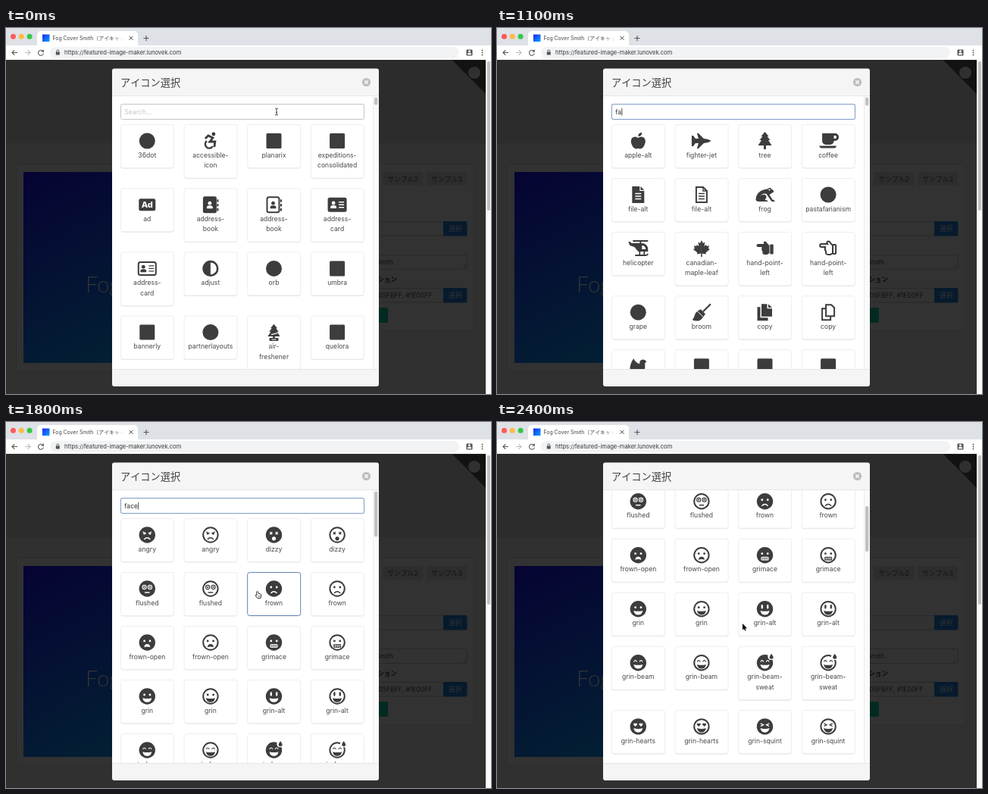
An HTML page with a canvas that plays this animation: 640x483 px, repeating every 2.5 s.

```html
<!DOCTYPE html>
<html lang="ja">
<head>
<meta charset="utf-8">
<title>Icon picker</title>
<style>
html, body { margin: 0; width: 100%; height: 100%; overflow: hidden; background: #303030; }
canvas { display: block; width: 640px; height: 483px; }
</style>
</head>
<body>
<canvas id="stage"></canvas>
<script>
const W = 640, H = 483, LOOP = 2500, STEP = 100;
const canvas = document.getElementById('stage');
const c = canvas.getContext('2d');
const ratio = window.devicePixelRatio || 1;
canvas.width = W * ratio;
canvas.height = H * ratio;

const SANS = 'Inter, "Noto Sans CJK JP", "Noto Sans CJK", sans-serif';
const INK = '#3d3d3d';

function rect(x, y, w, h, fill, r = 0, stroke, lw = 1) {
  c.beginPath();
  c.roundRect(x, y, w, h, r);
  if (fill) { c.fillStyle = fill; c.fill(); }
  if (stroke) { c.strokeStyle = stroke; c.lineWidth = lw; c.stroke(); }
}
function disc(x, y, r, fill) {
  c.beginPath();
  c.arc(x, y, r, 0, 7);
  c.fillStyle = fill;
  c.fill();
}
function ring(x, y, r, stroke, lw) {
  c.beginPath();
  c.arc(x, y, r, 0, 7);
  c.strokeStyle = stroke;
  c.lineWidth = lw;
  c.stroke();
}
function line(d, stroke, lw = 1) {
  c.strokeStyle = stroke;
  c.lineWidth = lw;
  c.stroke(new Path2D(d));
}
function shape(d, fill = INK) {
  c.fillStyle = fill;
  c.fill(new Path2D(d), 'evenodd');
}
function text(s, x, y, size, fill, align = 'left', weight = 400, family = SANS) {
  c.font = `${weight} ${size}px ${family}`;
  c.textAlign = align;
  c.fillStyle = fill;
  c.fillText(s, x, y);
}

// Faces: [eyes, mouth]
const faces = {
  'angry': ['angry', 'frown'], 'dizzy': ['cross', 'round'], 'flushed': ['ring', 'flat'],
  'frown': ['dot', 'frown'], 'frown-open': ['dot', 'gasp'], 'grimace': ['dot', 'teeth'],
  'grin': ['dot', 'grin'], 'grin-alt': ['tall', 'grin'], 'grin-beam': ['arc', 'grin'],
  'grin-beam-sweat': ['arc', 'grin'], 'grin-hearts': ['heart', 'grin'], 'grin-squint': ['squint', 'grin']
};
const eyes = {
  dot(f) { disc(0, 0, 1.4, f); },
  angry(f, side) { line(`M${-2.3 * side},0 L${2.2 * side},-2`, f, 1.3); disc(0, .3, 1.4, f); },
  cross(f) { line('M-1.5,-1.8 L1.5,1.2 M1.5,-1.8 L-1.5,1.2', f, 1.4); },
  ring(f) { ring(0, 0, 2.6, f, 1.1); disc(0, 0, 1.1, f); },
  tall(f) { c.beginPath(); c.ellipse(0, -1, 1.3, 3, 0, 0, 7); c.fillStyle = f; c.fill(); },
  arc(f) { line('M-2,.8 Q0,-2.8 2,.8', f, 1.2); },
  heart(f) { shape('M0,2 L-2.6,-.6 Q-2.7,-2.6 -1,-2.5 L0,-1.8 Q2.4,-3.4 2.6,-.6Z', f); },
  squint(f, side) { line(`M${2 * side},-2 L${-1.7 * side},-.2 L${2 * side},1.6`, f, 1.3); }
};
const mouths = {
  frown(f) { line('M-4,6 Q0,1.6 4,6', f, 1.5); },
  round(f) { disc(0, 4.8, 2.6, f); },
  flat(f) { line('M-3.2,5 H3.2', f, 1.5); },
  gasp(f) { shape('M-4,6.2 Q-3.5,2 0,2 Q3.5,2 4,6.2 Q0,4.6 -4,6.2Z', f); },
  grin(f) { shape('M-6,2.2 Q0,4 6,2.2 Q5,7.8 0,7.8 Q-5,7.8 -6,2.2Z', f); },
  teeth(f, back) {
    rect(-5.2, 2, 10.4, 5, f, 2);
    line('M-5,4.5 H5 M-2.5,2 V7 M0,2 V7 M2.5,2 V7', back, .6);
  }
};
function face(name, outline) {
  const ink = outline ? INK : '#fff', back = outline ? '#fff' : INK;
  const [eye, mouth] = faces[name];
  if (outline) ring(0, 0, 9.7, INK, 2); else disc(0, 0, 10.7, INK);
  for (const side of [-1, 1]) {
    c.save();
    c.translate(3.7 * side, -2);
    eyes[eye](ink, side);
    c.restore();
  }
  mouths[mouth](ink, back);
  if (name.endsWith('sweat')) {
    disc(8, -8, 4.2, '#fff');
    shape('M8.5,-12 Q14,-5 8.5,-5 Q3.5,-5 8.5,-12Z');
  }
}

function person(x, y, s, fill) {
  disc(x, y - 2.6 * s, 2.4 * s, fill);
  rect(x - 4 * s, y + .4 * s, 8 * s, 4 * s, fill, [3 * s, 3 * s, .6, .6]);
}
function panel(x, y, w, h, r, outline) {
  if (outline) rect(x + 1, y + 1, w - 2, h - 2, '#fff', r, INK, 2);
  else rect(x, y, w, h, INK, r);
  return outline ? INK : '#fff';
}
// Filled, or outlined with a white inside
function solid(d, outline) {
  if (outline) { shape(d, '#fff'); line(d, INK, 2); } else shape(d);
}
const TREE = 'M0,-12 L5,-6 H3 L7,-1 H4.5 L9,6 H1.5 V11 H-1.5 V6 H-9 L-4.5,-1 H-7 L-3,-6 H-5Z';
const icons = {
  square() { rect(-10, -10, 20, 20, INK, 1.5); },
  circle() { disc(0, 0, 10.5, INK); },
  wheel() {
    disc(4, -9, 2.4, INK);
    line('M-7,-3 L-3,-7 L3,-4 L-1,1 H6 L5,8', INK, 2.8);
    line('M-5,0 A5.4,5.4 0 1 0 3,7', INK, 2.4);
  },
  ad() {
    rect(-11, -8, 22, 16, INK, 2.5);
    text('Ad', 0, 4, 11, '#fff', 'center', 800);
  },
  book(o) {
    const f = panel(-10, -11, 18, 22, 2.5, o);
    for (const y of [-7, -1.2, 4.6]) rect(8.5, y, 2, 3.6, INK, .5);
    person(-1, .6, 1, f);
  },
  card(o) {
    const f = panel(-12.5, -9.5, 25, 19, 2.5, o);
    person(-5, .4, 1, f);
    line('M2,-3.5 H9 M2,0 H9 M2,3.5 H9', f, 1.4);
  },
  adjust() { ring(0, 0, 9.3, INK, 2.6); shape('M0,-9 A9,9 0 0 0 0,9Z'); },
  freshener() {
    c.save(); c.scale(.9, .9); shape(TREE); c.restore();
    rect(-6, 7.5, 12, 4, INK, 1);
    line('M-3.5,3 L4.5,1', '#fff', 1.2);
    line('M-3,9.5 H3', '#fff', 1);
  },
  fruit() {
    shape('M0,-4 Q4,-7 8,-4 Q11,0 8,6 Q5,12 0,9.8 Q-5,12 -8,6 Q-11,0 -8,-4 Q-4,-7 0,-4Z');
    shape('M0,-6 Q0,-11 5,-11 Q5,-6 0,-6Z');
  },
  jet() {
    shape('M13,0 Q8,-3 3,-3 L-4,-10 H-6 L-4,-3 H-8 L-11,-7 H-13 V7 H-11 L-8,3 H-4 L-6,10 H-4 L3,3 Q8,3 13,0Z');
  },
  tree() { shape(TREE); },
  cup() {
    shape('M-8,-10 H9 a5,5 0 0 1 0,10 H7.5 a5,5 0 0 1 -5,5 H-3 a5,5 0 0 1 -5,-5Z M7.5,-7 V-3 H9 a2,2 0 0 0 0,-4Z');
    shape('M-12,6.5 H11 Q10,9.5 8,9.5 H-9 Q-11,9.5 -12,6.5Z');
  },
  file(o) {
    solid(o ? 'M-7,-10 H2 L7,-5 V10 H-7Z' : 'M-8,-11 H2 V-5 H8 V11 H-8Z M3.2,-11 L8,-6.2 H3.2Z', o);
    if (o) line('M2,-10 V-5 H7', INK, 1.4);
    line('M-4,-1.5 H4 M-4,2 H4 M-4,5.5 H4', o ? INK : '#fff', 1.5);
  },
  frog() {
    shape('M12,-4 Q11,-7 8.5,-7.5 Q7,-11 3.5,-7.5 Q-11,-6 -12,6 Q-12,9 -8,9 H4 Q4,7 0,7 Q4,2 0,0 Q-4,-1 -6,2 Q-3,-3 2,-1 L9,9 H13 Q13,7 10,6.5 L6,0Z');
    disc(6, -6.5, 1.1, '#fff');
  },
  copter() {
    shape('M-7,-11 H13 V-9 H4 V-7 H5 a8,8 0 0 1 8,8 V4 H0 L-5,-2 L-11,-4 L-13,-9 H-11 L-8.5,-7 H2 V-9 H-7Z M5,-4 V1 H10 a5,5 0 0 0 -5,-5Z');
    line('M-4,9 H10 Q12,9 13,7 M2,4 V9 M8,4 V9', INK, 1.8);
  },
  leaf() {
    const half = 'M0,-11 L2,-7 L4.5,-8.5 L3.5,-3 L6,-5 L7,-3 L10,-4 L9,0 L11,1 L5.5,5.5 L6,7.5 L.8,6.5 V11 H0Z';
    shape(half);
    c.scale(-1, 1);
    shape(half);
  },
  hand(o) {
    solid('M-9,-6 H-1 Q-3,-9 0,-9.5 Q2,-9.5 3,-7 L6,-4 V6 L3,8 H0 Q-4,8 -3,4 Q-5,2 -4,-2 H-9 a2,2 0 0 1 0,-4Z', o);
    if (o) rect(6, -5, 4, 12, '#fff', 1, INK, 2); else rect(6.8, -5.5, 4.4, 13, INK, 1);
  },
  broom() {
    line('M12,-11 L2,-1', INK, 2.2);
    shape('M-1,-4 L5,2 Q1,9 -3,11 Q-8,12 -12,10 Q-9,5 -8,1 Q-5,-3 -1,-4Z');
    line('M-6,-2 L2,6', '#fff', 1);
  },
  copy(o) {
    solid(o ? 'M-8,-5 H3 V10 H-8Z' : 'M-10,-7 H-6 V7 H4 V11 H-10Z', o);
    solid(o ? 'M-3,-10 H4 L8,-6 V5 H-3Z' : 'M-4.5,-11 H3 V-5 H9.5 V5.5 H-4.5Z M4.5,-11 L9.5,-6.2 H4.5Z', o);
  },
  dove() {
    shape('M9,-8 L11,-6 L9,-4 V2 Q8,8 1,8 L-2,11 H-5 L-3,7 Q-9,6 -11,3 Q-10,-5 -6,-10 Q-3,-4 2,-3 V-6 Q4,-10 9,-8Z');
  },
  industry() { shape('M-11,-10 H-6 V0 L2,-6 V0 L11,-6 V9.5 H-11Z'); }
};

// "label=icon"; "|" breaks the line, "*" asks for the outlined version
const both = names => names.split(' ').flatMap(n => [n, n + '*']);
const lists = {
  all: ['36dot=circle', 'accessible-|icon=wheel', 'planarix=square', 'expeditions-|consolidated=square',
    'ad=ad', 'address-|book=book', 'address-|book=book*', 'address-|card=card',
    'address-|card=card*', 'adjust=adjust', 'orb=circle', 'umbra=square',
    'bannerly=square', 'partnerlayouts=circle', 'air-|freshener=freshener', 'quelora=square'],
  letter: ['apple-alt=fruit', 'fighter-jet=jet', 'tree=tree', 'coffee=cup',
    'file-alt=file', 'file-alt=file*', 'frog=frog', 'pastafarianism=circle',
    'helicopter=copter', 'canadian-|maple-leaf=leaf', 'hand-point-|left=hand', 'hand-point-|left=hand*',
    'grape=circle', 'broom=broom', 'copy=copy', 'copy=copy*',
    'dove=dove', 'chatfolk=square', 'chatfolk-c=square', 'dice=square'],
  partial: ['chatfolk=square', 'chatfolk-c=square', 'industry=industry', 'angry',
    'angry*', 'dizzy', 'dizzy*', 'chatfolk-|messenger=circle',
    'chatfolk-|square=square', ...both('flushed'), 'frown', 'frown*', ...both('frown-open'),
    'grimace', 'grimace*', ...both('grin'), 'grin-alt'],
  faces: both('angry dizzy flushed frown frown-open grimace grin grin-alt grin-beam grin-beam-|sweat grin-hearts grin-squint')
};

function drawCard(item, x, y, hovered) {
  const outline = item.endsWith('*');
  const [label, icon] = item.replace('*', '').split('=');
  const rows = label.split('|');
  const h = 44.5 + 13.5 * rows.length;
  rect(x + .5, y + 1.5, 70, h - 1, '#e2e2e2', 3);
  rect(x + .5, y + .5, 70, h - 1, '#fff', 3, hovered ? '#6283b8' : '#eeeeee');
  c.save();
  c.translate(x + 35.3, y + 22);
  if (icon) icons[icon](outline); else face(label.replace('|', ''), outline);
  c.restore();
  rows.forEach((s, i) => text(s, x + 35.3, y + 43.6 + 13.6 * i, 8.6, '#484848', 'center'));
}
function drawGrid(items, top, hover) {
  for (let i = 0, y = top; i < items.length; i += 4) {
    const row = items.slice(i, i + 4);
    row.forEach((item, k) => drawCard(item, 151 + 83.6 * k, y, hover === i + k));
    y += row.some(s => s.includes('|')) ? 84.2 : 71;
  }
}

function drawBrowser() {
  rect(0, 0, W, 24, '#dee1e6');
  ['#fc5b57', '#fdbc40', '#34c84a'].forEach((f, i) => disc(9.5 + 10.8 * i, 11.2, 3.5, f));
  rect(41, 4, 133, 24, '#fff', 5);
  rect(0, 23, W, 19, '#fff');
  const g = c.createLinearGradient(48, 8, 58, 18);
  g.addColorStop(0, '#1e20f0');
  g.addColorStop(1, '#08a8ff');
  rect(48, 8.5, 9.5, 9.5, g);
  c.save();
  c.beginPath(); c.rect(60, 4, 96, 18); c.clip();
  const fade = c.createLinearGradient(140, 0, 156, 0);
  fade.addColorStop(0, '#444');
  fade.addColorStop(1, '#fff');
  text('Fog Cover Smith（アイキャッチ画像', 61.5, 16, 6.9, fade);
  c.restore();
  line('M162.5,10.8 l5,5 m0,-5 l-5,5', '#444', 1);
  line('M185,10 v7 m-3.5,-3.5 h7', '#555', 1.1);
  line('M15,32.5 H8 m3.3,-3.3 l-3.3,3.3 l3.3,3.3', '#555', 1.1);
  line('M25,32.5 h7 m-3.3,-3.3 l3.3,3.3 l-3.3,3.3', '#bbb', 1.1);
  line('M48.7,30.4 A3.5,3.5 0 1 0 49.5,33.5 M49.3,28.6 V31.2 H46.6', '#555', 1.1);
  rect(58, 25, 540, 15, '#f1f3f4', 7.5);
  rect(65.8, 31.5, 5, 4, '#555', .6);
  line('M66.8,32 v-1.6 a1.5,1.5 0 0 1 3,0 v1.6', '#555', .9);
  text('https://featured-image-maker.lunovek.com', 77, 35.3, 7.6, '#3a3a3a');
  rect(607.5, 28.5, 8, 8, '#555', 1);
  person(611.5, 32.4, .65, '#fff');
  for (const y of [29.5, 32.5, 35.5]) disc(628.5, y, .9, '#555');
}

function drawPage() {
  rect(0, 42, 633, 441, '#303030');
  rect(0, 42, 633, 110, '#2c2c2c');
  rect(633, 42, 7, 441, '#fafafa');
  rect(635, 44, 4, 197, '#c1c1c1', 2);
  shape('M589,42.5 H633 V87Z', '#121212');
  disc(618, 59, 8, '#303030');
  rect(13.5, 179.5, 470, 274, '#323232', 2, '#2c2c2c');
  rect(400, 179.5, 218, 220, '#323232', 2, '#2c2c2c');
  const g = c.createLinearGradient(138, 100, 356, 532);
  g.addColorStop(0, '#060033');
  g.addColorStop(1, '#013233');
  rect(23, 190, 448, 252, g);
  text('Fog Cover', 105, 349, 29, '#343434', 'left', 300, 'Lato, sans-serif');
  [['サンプル2', 497], ['サンプル3', 555]].forEach(([s, x]) => {
    rect(x, 190, 53, 18, '#2d2d2d', 2);
    text(s, x + 26.5, 202.5, 8.8, '#141414', 'center');
  });
  for (const y of [255, 343]) {
    rect(440.5, y + .5, 137, 18.5, null, 2, '#282828');
    rect(577, y, 31.5, 19.5, '#071a2d', [0, 2, 2, 0]);
    text('選択', 592.7, y + 13, 8.8, '#303336', 'center');
  }
  rect(440.5, 299.5, 168, 19, null, 2, '#282828');
  text('Fog Cover Smith', 511, 312, 8.6, '#101010', 'right');
  line('M602,317 l5,-5 M605,317 l2,-2', '#222', .8);
  text('グラデーション', 516, 334.5, 8.6, '#0c0c0c', 'right', 700);
  text('#05FBFF, #1E00FF', 562.5, 356, 8.6, '#101010', 'right');
  rect(450, 369, 54, 20, '#022a22', 2);
}

function drawDialog(s) {
  rect(140, 53.5, 352, 419.5, '#f5f5f5', 3);
  text('アイコン選択', 151, 76.5, 13.2, '#424242');
  disc(475.5, 71.5, 5.6, '#bdbdbd');
  line('M473.3,69.3 l4.4,4.4 m0,-4.4 l-4.4,4.4', '#fff', 1.3);
  rect(140, 89, 352, 362, '#e6e6e6');
  rect(140, 90, 352, 360, '#fff');
  c.save();
  c.beginPath(); c.rect(140, 90, 344, 360); c.clip();
  c.translate(0, -s.scroll);
  rect(151.5, 100.5, 321, 20, '#fff', 2, '#c4c4c4');
  if (s.focus) {
    c.globalAlpha = s.focus;
    rect(151.5, 100.5, 321, 20, null, 2, '#7f9ac6');
    c.globalAlpha = 1;
  }
  text(s.query || 'Search...', 156.3, 114, 8.6, s.query ? '#333' : '#c6c6c6');
  if (s.caret) {
    const w = s.query ? c.measureText(s.query).width : 0;
    rect(156.6 + w, 106, .8, 9.5, '#222');
  }
  drawGrid(lists[s.list], 127, s.hover);
  c.restore();
  rect(484, 90, 8, 360, '#fafafa');
  rect(484, 90, .8, 360, '#e8e8e8');
  const thumb = { all: 10, letter: 11, partial: 77, faces: 60 }[s.list];
  rect(486, 91.5 + s.scroll * .17, 4.4, thumb, '#c1c1c1', 2.2);
}

const cursors = {
  beam() { line('M-2,-4.5 Q0,-4.5 0,-3 V3 Q0,4.5 -2,4.5 M2,-4.5 Q0,-4.5 0,-3 M0,3 Q0,4.5 2,4.5 M-1,.8 H1', '#333', .9); },
  arrow() {
    const d = 'M0,0 V8.4 L1.9,6.7 L3.2,9.6 L4.6,9 L3.4,6.2 H6Z';
    line(d, '#fff', 1.2);
    shape(d, '#000');
  },
  hand() {
    const d = 'M-2,-4 Q-1,-5.4 0,-4 L.6,-1.6 L3.2,-1 Q4.6,-.6 4.3,1 L3.6,4.6 H-.6 L-3.6,.8 Q-3.2,-.4 -1.4,.6Z';
    shape(d, '#fff');
    line(d, '#222', .9);
    line('M1,1 V3 M2.4,1 V3', '#222', .6);
  }
};

// Latest entry whose start time has passed
const at = (t, keys) => keys.filter(k => k[0] <= t).pop()[1];
function stateAt(t) {
  return {
    focus: Math.min(1, t / 300),
    query: at(t, [[0, ''], [800, 'f'], [1000, 'fa'], [1200, 'fac'], [1400, 'face']]),
    caret: at(t, [[0, false], [100, true], [600, false], [800, true], [1900, false], [2400, true]]),
    list: at(t, [[0, 'all'], [900, 'letter'], [1300, 'partial'], [1500, 'faces']]),
    scroll: at(t, [[0, 0], [2300, 45], [2400, 115.3]]),
    hover: at(t, [[0, -1], [1700, 2], [1800, 6], [2000, -1]]),
    pointer: at(t, [[0, ['beam', 357, 110.5]], [800, null], [1700, ['hand', 343, 172]],
      [1800, ['hand', 332.5, 228]], [1900, ['hand', 330, 243]], [2000, ['arrow', 327, 259]],
      [2100, ['arrow', 325, 264]], [2200, ['arrow', 324, 266]]])
  };
}

function draw(now) {
  const t = Math.floor((now % LOOP) / STEP) * STEP;
  const s = stateAt(t);
  c.setTransform(ratio, 0, 0, ratio, 0, 0);
  drawPage();
  drawBrowser();
  drawDialog(s);
  if (s.pointer) {
    const [kind, x, y] = s.pointer;
    c.save();
    c.translate(x, y);
    cursors[kind]();
    c.restore();
  }
}

let start;
function tick(now) {
  start ??= now;
  draw(now - start);
  requestAnimationFrame(tick);
}
requestAnimationFrame(tick);
</script>
</body>
</html>
```
